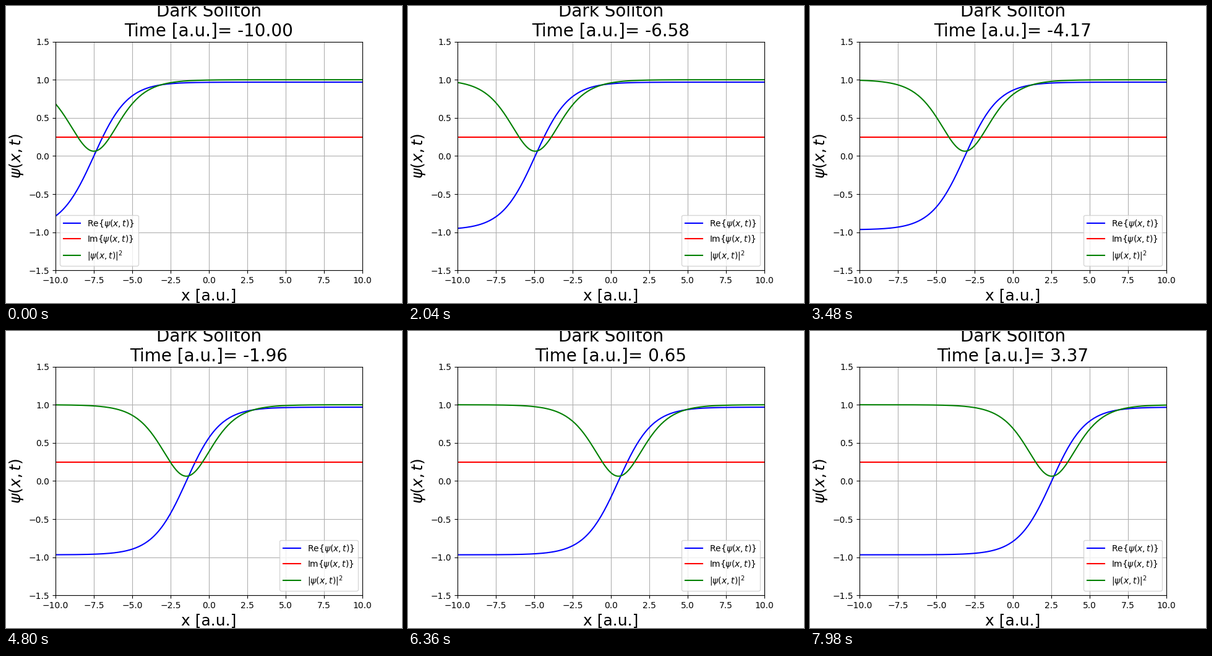
These frames come from a looping animation (640 by 480 pixels, 8000 ms). A matplotlib script:

```python
import numpy as np
import matplotlib.pyplot as plt
from matplotlib.animation import FuncAnimation

TICK = 20          # ms per animation frame
HOLD = 3           # each time step lasts three ticks
FRAMES = 400

DEPTH = 0.25       # constant imaginary part
SPEED = 0.75
AMP = np.sqrt(1 - DEPTH**2)
WIDTH = 1.5 * np.sqrt(2)

x = np.linspace(-10, 10, 200)
times = np.linspace(-10, 10, 200)


def soliton(t):
    return AMP * np.tanh(AMP * (x - SPEED * t) / WIDTH) + 1j * DEPTH


fig, ax = plt.subplots(figsize=(6.4, 4.8), dpi=100)
ax.set_xlim(-10, 10)
ax.set_ylim(-1.5, 1.5)
ax.set_xlabel("x [a.u.]", fontsize=18)
ax.set_ylabel(r"$\psi(x,t)$", fontsize=18)
ax.grid(True)
title = ax.set_title("", fontsize=20)

real, = ax.plot(x, x, "b", label=r"Re{$\psi(x,t)$}")
imag, = ax.plot(x, x, "r", label=r"Im{$\psi(x,t)$}")
density, = ax.plot(x, x, "g", label=r"$|\psi(x,t)|^2$")
ax.legend(loc="best")


def update(frame):
    t = times[frame // HOLD]
    psi = soliton(t)
    real.set_ydata(psi.real)
    imag.set_ydata(psi.imag)
    density.set_ydata(np.abs(psi)**2)
    title.set_text(f"Dark Soliton\nTime [a.u.]= {t:.2f}")
    return real, imag, density, title


anim = FuncAnimation(fig, update, frames=FRAMES, interval=TICK,
                     init_func=lambda: update(0), repeat=True, repeat_delay=0)
plt.show()
```
